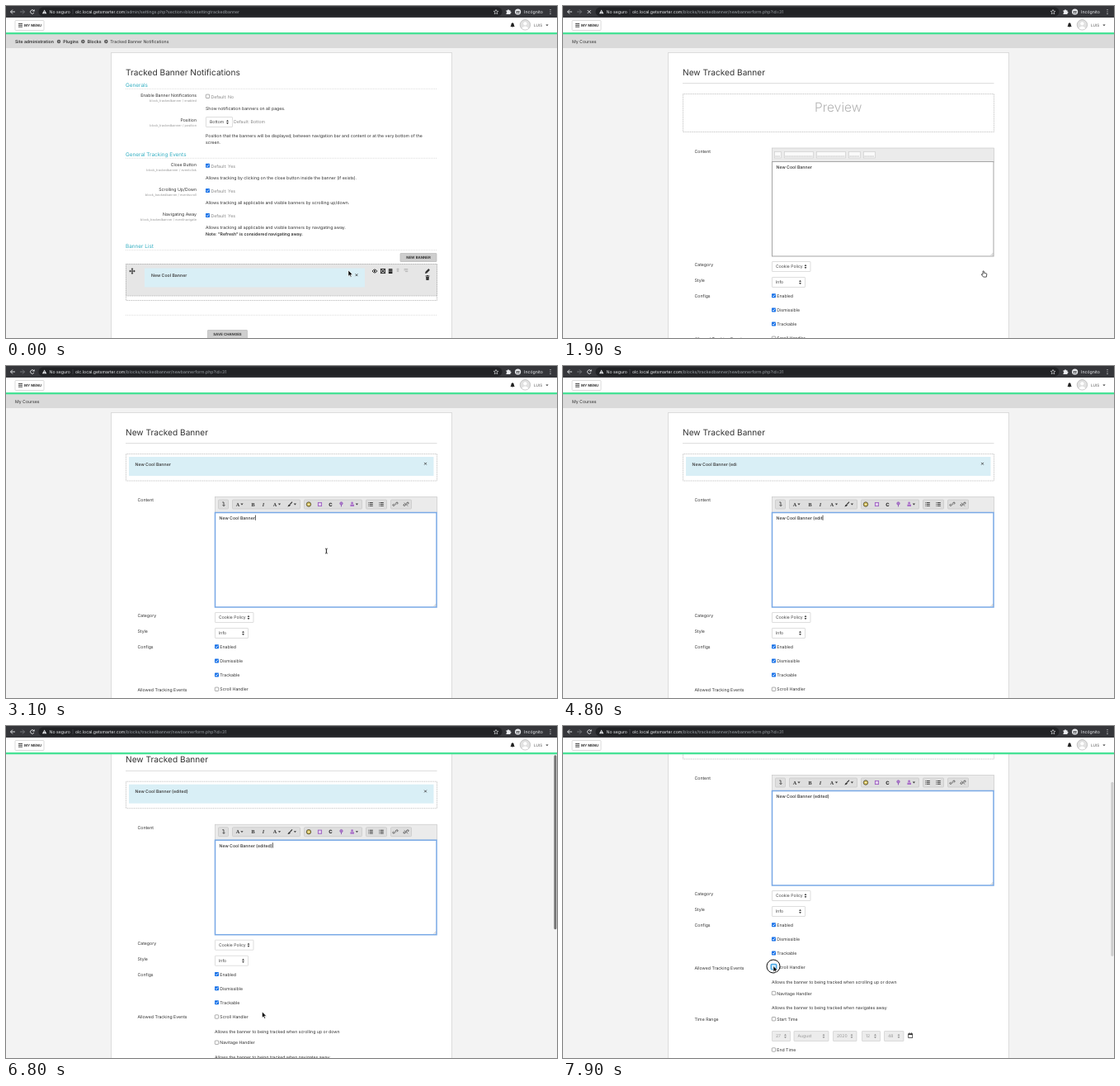
Recreate the animation shown at these times as an HTML page. Size 668 by 402 pixels, loop 8000 ms.

```html
<!DOCTYPE html>
<html lang="en">
<head>
<meta charset="utf-8">
<title>Tracked banner settings</title>
<style>
  html, body { margin: 0; width: 100%; height: 100%; overflow: hidden; background: #f3f3f3; }
  svg { display: block; width: 668px; height: 402px; }
  text { font: 5.2px Inter, "Open Sans", sans-serif; text-rendering: geometricPrecision; white-space: pre; }
</style>
</head>
<body>
<svg id="stage" viewBox="0 0 668 402"></svg>
<script>
const LOOP = 8000;
const BASE_TEXT = 'New Cool Banner', ADDED_TEXT = ' (edited)';
const HOST = 'olc.local.getsmarter.com';
const OLD_PATH = '/admin/settings.php?section=blocksettingtrackedbanner';
const NEW_PATH = '/blocks/trackedbanner/newbannerform.php?id=31';
const INK = '#333', TEAL = '#35afc2', INFO = '#d9eff6', BLUE = '#1a73e8';

// Markup helpers
const text = (x, y, s, { size = 5.2, weight = 400, fill = INK, anchor = 'start', id = '', extra = '' } = {}) =>
  `<text id="${id}" x="${x}" y="${y}" fill="${fill}" text-anchor="${anchor}"
    style="font-size:${size}px;font-weight:${weight};${extra}">${s}</text>`;
const rect = (x, y, w, h, fill, stroke = 'none', extra = '') =>
  `<rect x="${x}" y="${y}" width="${w}" height="${h}" fill="${fill}" stroke="${stroke}" ${extra}/>`;
const path = (d, stroke = INK, width = 1, fill = 'none', extra = '') =>
  `<path d="${d}" fill="${fill}" stroke="${stroke}" stroke-width="${width}" ${extra}/>`;
const shape = (d, fill = INK) => path(d, 'none', 0, fill);
const circle = (x, y, r, fill, stroke = 'none', width = 1) =>
  `<circle cx="${x}" cy="${y}" r="${r}" fill="${fill}" stroke="${stroke}" stroke-width="${width}"/>`;
const group = (id, ...parts) => `<g id="${id}">${parts.join('')}</g>`;
const rule = (y, dash = '1 1') => path(`M145 ${y}H522.5`, '#c4c4c4', .6, 'none', `stroke-dasharray="${dash}"`);
const downCaret = (x, y) => shape(`M${x - 1.6} ${y - .8}h3.2l-1.6 1.8z`);
const cross = (x, y, r, color, width) =>
  path(`M${x - r} ${y - r}l${2 * r} ${2 * r}m0 ${-2 * r}l${-2 * r} ${2 * r}`, color, width);

const checkbox = (x, y, on) => on
  ? rect(x, y - 2.5, 5, 5, BLUE, 'none', 'rx=".7"') + path(`M${x + 1} ${y}l1.1 1.2 2-2.5`, '#fff', .8)
  : rect(x + .3, y - 2.2, 4.4, 4.4, '#fff', '#767676', 'stroke-width=".6" rx=".7"');

const select = (x, y, w, label, disabled) => {
  const color = disabled ? '#999' : '#444', ax = x + w - 6.5;
  return rect(x + .5, y + .5, w - 1, 12, disabled ? '#ececec' : '#fff', '#d0d0d0', 'stroke-width=".7" rx=".5"') +
    text(x + 5, y + 8.4, label, { fill: color, size: 5.1 }) +
    shape(`M${ax - 1.4} ${y + 6}h2.8l-1.4-2.2zM${ax - 1.4} ${y + 7}h2.8l-1.4 2.2z`, color);
};

const button = (x, y, w, h, label) =>
  rect(x + .5, y + .5, w - 1, h - 1, '#cecece', '#b9b9b9', 'stroke-width=".7" rx=".5"') +
  text(x + w / 2, y + 7.3, label, { size: 4.35, weight: 700, anchor: 'middle' });

const setting = (y, label, key, on, note) =>
  text(231, y, label, { anchor: 'end' }) +
  text(231, y + 6.2, `block_trackedbanner / ${key}`, { size: 3.9, fill: '#999', anchor: 'end' }) +
  (on === null ? '' : checkbox(242, y - .5 + (on ? 0 : .2), on) + text(248.5, y + 2.1, `Default: ${on ? 'Yes' : 'No'}`, { fill: '#888' })) +
  text(242, y + (on === null ? 18.7 : 16.3), note);

const heading = (y, label) => text(145, y, label, { size: 6.4, fill: TEAL }) + rule(y + 2.3);
const option = (y, label, on) => checkbox(253, y, on) + text(259.3, y + 2, label);
const formLabel = (y, label) => text(159.5, y, label);

const backdrop = rect(0, 34, 668, 17, '#dadada') + rect(127.5, 56.5, 413, 700, '#fff', '#dcdcdc');

const crumb = (x, label) => text(x, 45, label, { weight: 600 });
const crumbDot = x => circle(x, 43, 2.2, '#555') + path(`M${x - .5} 41.8l1.1 1.2-1.1 1.2`, '#fff', .6);

const rowIcons =
  path('M153 318v6M150 321h6', INK, 1.1) + shape('M153 317l1.4 1.7h-2.8zM153 325l1.4-1.7h-2.8zM149.2 321l1.7-1.4v2.8zM156.8 321l-1.7-1.4v2.8z') +
  path('M444 321q3-4 6 0q-3 4-6 0z', '#222', .9) + circle(447, 321, 1.1, '#222') +
  rect(454.4, 318.4, 5.2, 5.2, '#fff', '#222', 'stroke-width=".9"') + cross(457, 321, 1.7, '#222', 1.2) +
  rect(463.8, 318.2, 4.6, 5.8, '#222') + path('M463.8 319.8h4.6M463.8 321.6h4.6', '#e6e6e6', .4) +
  path('M475 317.5v4.5M473.3 318.8h3.4M473.6 321h2.8', '#aaa', .7) +
  path('M482.5 318.5h4.8M482.5 320h4.8M484 321.6h3.3', '#aaa', .7) +
  shape('M508 324l.6-2.2 3.7-3.7 1.6 1.6-3.7 3.7z') +
  shape('M508.6 326.6h4.8v.9h-4.8zM509.1 328h3.8l-.3 4h-3.2zM510 326h2v.6h-2z');

const settingsPage = group('settingsPage',
  crumb(11, 'Site administration'), crumbDot(64), crumb(69.3, 'Plugins'), crumbDot(93.3),
  crumb(98.8, 'Blocks'), crumbDot(121.3), text(126.3, 45, 'Tracked Banner Notifications'),
  text(145, 83.6, 'Tracked Banner Notifications', { size: 10.15 }),
  heading(98, 'Generals'),
  setting(109.6, 'Enable Banner Notifications', 'enabled', false, 'Show notification banners on all pages.'),
  setting(140, 'Position', 'position', null,
    'Position that the banners will be displayed; between navigation bar and content or at the very bottom of the'),
  text(242, 167, 'screen.'),
  select(242, 134, 33, 'Bottom'), text(276, 142, 'Default: Bottom', { fill: '#888' }),
  heading(182, 'General Tracking Events'),
  setting(193.8, 'Close Button', 'eventclick', true, 'Allows tracking by clicking on the close button inside the banner (if exists).'),
  setting(224, 'Scrolling Up/Down', 'eventscroll', true, 'Allows tracking all applicable and visible banners by scrolling up/down.'),
  setting(254, 'Navigating Away', 'eventnavigate', true, 'Allows tracking all applicable and visible banners by navigating away.'),
  text(242, 278.3, 'Note: "Refresh" is considered navigating away.', { weight: 600 }),
  heading(293.3, 'Banner List'),
  button(477.5, 299, 45, 11, 'NEW BANNER'),
  rect(145.5, 312.5, 377, 44, '#fff', '#aaa', 'stroke-width=".7" stroke-dasharray="1 .6"'),
  rect(145.5, 312.5, 377, 38.5, '#e6e6e6', '#aaa', 'stroke-width=".7" stroke-dasharray="1 .6"'),
  rect(168, 317.5, 267, 23, INFO),
  text(176, 328, BASE_TEXT, { weight: 600, fill: '#444' }),
  cross(425, 325.7, 1.4, '#333', .8),
  rowIcons,
  group('focusRings',
    rect(506.5, 316.5, 9, 8.5, 'none', '#2d9fd0', 'stroke-width="1.2"'),
    rect(491, 317, 3, 9, 'none', '#2d9fd0', 'stroke-width="1.2"')),
  rule(374.3),
  button(244, 392, 49, 14, 'SAVE CHANGES'));

// Editor toolbar once loaded
const toolGroup = (x1, x2) => rect(x1 + .5, 162, x2 - x1 - 1, 11, '#dedede', '#c6c6c6', 'stroke-width=".7" rx="1"');
const letter = (x, s, extra = '') =>
  text(x, 169.5, s, { size: 6.2, weight: 700, anchor: 'middle', extra: `font-family:'Liberation Serif',serif;${extra}` });
const listIcon = x => [165.5, 167.4, 169.3].map(y => path(`M${x - 2.6} ${y}h1M${x - 1} ${y}h3.8`, INK, .9)).join('');
const chain = x => path(`M${x - .4} 168.2l-1 1a1 1 0 0 1-1.4-1.4l1-1M${x + .4} 166.2l1-1a1 1 0 0 1 1.4 1.4l-1 1M${x - .8} 168l1.6-1.6`, INK, .8);
const toolbar =
  toolGroup(257, 270) + toolGroup(274, 357) + toolGroup(361, 432) + toolGroup(436, 462) + toolGroup(466, 492) +
  path('M262.3 165h1.7v4.5M262.6 168.2l1.4 1.5 1.4-1.5', INK, .8) +
  letter(281, 'A') + downCaret(286, 167.4) + letter(299.5, 'B') + letter(312, 'I', 'font-style:italic') +
  letter(326, 'A') + downCaret(331.5, 167.4) +
  path('M347 164.6l-2.6 2.8', INK, 1.2) + shape('M341.2 170.2q1-.4 1.2-2l1.6-.9 1 1q-.8 2.2-3.8 1.9z') + downCaret(350.4, 167.4) +
  circle(367, 167.5, 2.7, '#d7c35a', '#55503a', .9) + circle(367, 167.5, .8, '#fff') +
  rect(378.4, 165.4, 4.2, 4.2, '#e5d2ef', '#9a5cc0', 'stroke-width=".9"') +
  text(393.5, 169.6, 'C', { size: 6, weight: 800, anchor: 'middle' }) +
  circle(406.5, 166.4, 1.7, '#b07fce', '#8b4fb3', .7) + path('M406.5 168v2.4', '#8b4fb3', .9) +
  circle(419.6, 166, 1.4, '#a96fc9') + rect(417.4, 167.6, 4.6, 2.4, '#a96fc9') + downCaret(425.4, 167.4) +
  listIcon(442) + listIcon(455) + chain(472) + chain(485) + path('M482.6 165.6l4.8 4', INK, .5);

const placeholders = [[256, 265], [268, 304], [307, 343], [346, 361], [364, 379]].map(([a, b]) =>
  rect(a + .5, 176.5, b - a - 1, 7.5, '#fafafa', '#cfcfcf', 'stroke-width=".7"') +
  path(`M${a + 1.5} 182H${b - 1.5}`, '#aaa', .8, 'none', 'stroke-dasharray="1.4 .6"')).join('');

const box = (y, h) => rect(145.5, y + .5, 377, h - 1, '#fff', '#b5b5b5', 'stroke-width=".7" stroke-dasharray="1 .6"');

const formPage = group('formPage',
  text(11, 45, 'My Courses'),
  text(145, 83.6, 'New Tracked Banner', { size: 10.15 }), rule(93.6, 'none'),
  group('loading',
    box(106, 47),
    text(333.7, 127.7, 'Preview', { size: 15.5, weight: 300, fill: '#b3b3b3', anchor: 'middle' }),
    formLabel(178, 'Content'),
    rect(253.5, 172, 269, 17, '#ebebeb', '#c9c9c9', 'stroke-width=".7"'), placeholders),
  group('ready',
    box(106, 33.5),
    rect(149, 110, 369.5, 23, INFO),
    text(156.5, 120.5, '', { id: 'previewText', weight: 600, fill: '#444' }),
    cross(508.5, 118.3, 1.4, '#333', .8),
    formLabel(164, 'Content'),
    rect(253.5, 158.5, 269, 19, '#ebebeb', '#c9c9c9', 'stroke-width=".7"'), toolbar),
  group('form',
    rect(253.5, 177.5, 268.5, 114.5, '#fff', '#a5a5a5', 'id="area"'),
    path('M518.5 291l3-3M520.2 291l1.3-1.3', '#999', .5),
    text(258.5, 185.8, '', { id: 'editorText', weight: 600, fill: '#444' }),
    rect(0, 180.6, .7, 6.2, '#111', 'none', 'id="caret"'),
    formLabel(304.2, 'Category'), select(253, 298, 47.5, 'Cookie Policy'),
    formLabel(323.2, 'Style'), select(253, 317, 41, 'Info'),
    formLabel(342, 'Configs'), option(339.8, 'Enabled', true), option(357, 'Dismissible', true), option(374, 'Trackable', true),
    formLabel(393.6, 'Allowed Tracking Events'), option(391.3, 'Scroll Handler', false),
    text(253, 410.8, 'Allows the banner to being tracked when scrolling up or down'),
    option(422.5, 'Navitage Handler', false),
    text(253, 442, 'Allows the banner to being tracked when navigates away'),
    formLabel(456, 'Time Range'), option(453.7, 'Start Time', false),
    select(253, 468, 23, '27', true), select(279.5, 468, 43, 'August', true), select(327, 468, 29.5, '2020', true),
    select(362, 468, 23, '12', true), select(389, 468, 24.5, '48', true),
    rect(418.7, 471.7, 5, 4.8, '#fff', '#333', 'stroke-width=".8"'), path('M418.5 472.5h5.4M420 470.4v1.4M422.4 470.4v1.4', INK, 1),
    option(491, 'End Time', false)));

const light = '#e8eaed';
const browserBar =
  rect(0, 0, 668, 14, '#35363a') + rect(39.5, 1.6, 562, 10.8, '#202124', 'none', 'rx="5.4"') +
  path('M11 7H5.6M8 4.5L5.5 7 8 9.5', light, .9) + path('M17 7h5.4M20 4.5L22.5 7 20 9.5', '#77797d', .9) +
  group('reload', path('M33.7 5.6A2.3 2.3 0 1 0 34 8', light, .9), shape('M34.6 4v2.6H32z', light)) +
  group('stop', cross(31.7, 7, 2, light, .9)) +
  shape('M46.6 4.4l2.7 4.9h-5.4z', light) + path('M46.6 6.2v1.4M46.6 8.1v.6', '#202124', .6) +
  text(52.5, 8.9, 'No seguro', { fill: light }) + path('M81 4v6', '#5f6368', .5) +
  `<text x="84" y="8.9" fill="${light}">${HOST}<tspan id="urlPath" fill="#9aa0a6"></tspan></text>` +
  path('M594 4.4l.8 1.8 2 .2-1.5 1.3.5 2-1.8-1-1.8 1 .5-2-1.5-1.3 2-.2z', light, .6) +
  shape('M606.5 5.3h1.5a1 1 0 0 1 2 0h1.5v1.5a1 1 0 0 1 0 2v1.3h-5v-1.4a1 1 0 0 0 0-1.9z', light) +
  circle(620.6, 7, 3.6, light) + path('M618.4 6.6h4.4', '#202124', .8) + circle(619.5, 8.2, .8, '#202124') + circle(621.7, 8.2, .8, '#202124') +
  text(628, 8.9, 'Incógnito', { fill: light }) +
  [4.6, 7, 9.4].map(y => circle(660, y, .6, light)).join('');

const siteBar =
  rect(0, 14, 668, 18, '#fff') + rect(0, 32, 668, 2.3, '#45e295') +
  rect(11, 17.5, 35, 12, '#fff', '#d3d3d3', 'stroke-width=".8" rx="1"') +
  path('M15 21.4h5M15 23.3h5M15 25.2h5', INK, .9) +
  text(22, 24.9, 'MY MENU', { size: 4.3, weight: 700 }) +
  shape('M611.4 25q1-.8 1-2.4 0-2.2 1.7-2.4 1.7.2 1.7 2.4 0 1.6 1 2.4zM613.3 25.4h1.6q-.8 1.2-1.6 0z', '#222') +
  circle(629.4, 22.8, 6.2, '#e2e2e2', '#a8a8a8', .6) + circle(629.4, 21.3, 2.1, '#fff') + shape('M625.2 27q4.2-5 8.4 0-4.2 3.2-8.4 0z', '#fff') +
  text(640, 24.8, 'LUIS', { size: 4.6, fill: '#555' }) + downCaret(656, 23.2);

const status = group('status',
  rect(0, 393.5, 161.5, 9, '#3a3b3f', '#55565a', 'id="statusBox" stroke-width=".6"'),
  text(1.5, 399.7, '', { id: 'statusText', size: 4.45, fill: light }));

const pointer = group('pointer',
  group('arrow', path('M0 0V7.2L1.7 5.7 2.8 8.2 4 7.7 2.9 5.2H5.2Z', '#fff', .6, '#000')),
  group('hand', path('M-1 1.6V-2a.7.7 0 0 1 1.4 0V-.3L3 .2q.9.2.8 1.2L3.3 4.6H-.4L-2.8 1.6q.4-1 1.8 0z', '#111', .7, '#fff')),
  group('ibeam', path('M-1.4-3Q0-3 0-2V2Q0 3-1.4 3M1.4-3Q0-3 0-2V2Q0 3 1.4 3', '#222', .8)));

document.getElementById('stage').innerHTML =
  rect(0, 0, 668, 402, '#f3f3f3') +
  group('page', backdrop, settingsPage, formPage) + siteBar + browserBar +
  rect(664.4, 0, 3, 211, '#5c5c5c', 'none', 'id="thumb" rx="1.5"') + status +
  group('clickRing', circle(255, 291, 8, '#fff', '#111', 1),
    rect(252.3, 288.5, 6.4, 6.2, '#d8efff', '#49a9e6', 'stroke-width="1.6" rx="1"')) + pointer;

// Motion
const $ = id => document.getElementById(id);
const show = (id, on) => $(id).setAttribute('display', on ? 'inline' : 'none');
const set = (id, name, value) => $(id).setAttribute(name, value);
const move = (id, x, y) => set(id, 'transform', `translate(${x} ${y})`);
const between = (t, a, b) => t >= a && t < b;
const progress = (t, a, b) => Math.min(1, Math.max(0, (t - a) / (b - a)));
const smooth = p => p * p * (3 - 2 * p);

// time, x, y
const pointerPath = [[0, 415, 320], [900, 510, 320], [1000, 510, 323.5], [2250, 510, 323.5], [2950, 388.5, 224],
  [6100, 376, 226], [6500, 310.5, 346], [7050, 310.5, 346], [7500, 255, 290.5], [LOOP, 255, 290.5]];
// time, number of added characters
const editorKeys = [[4000, 2], [4300, 3], [4600, 5], [4800, 6], [5000, 7], [5200, 8], [5500, 9]];
const previewKeys = [[4100, 2], [4400, 3], [4600, 5], [5000, 7], [5200, 8], [5600, 9]];

const typed = (keys, t) => BASE_TEXT + ADDED_TEXT.slice(0, keys.reduce((n, [at, count]) => t >= at ? count : n, 0));

function pointerAt(t) {
  const i = pointerPath.findIndex(([at]) => t < at);
  const [t0, x0, y0] = pointerPath[i - 1], [t1, x1, y1] = pointerPath[i];
  const p = smooth(progress(t, t0, t1));
  return [x0 + (x1 - x0) * p, y0 + (y1 - y0) * p];
}

function draw(t) {
  const onForm = t >= 1700, ready = t >= 2400, focused = t >= 3000;
  const scroll = 99 * (1 - (1 - progress(t, 6600, 7500)) ** 2);

  show('settingsPage', !onForm);
  show('formPage', onForm);
  show('focusRings', t >= 1200);
  show('loading', !ready);
  show('ready', ready);
  move('form', 0, ready ? 0 : 11);
  move('page', 0, -scroll);
  set('area', 'stroke', focused ? '#78a9e6' : '#a5a5a5');
  set('area', 'stroke-width', focused ? 1.5 : 1);

  $('editorText').textContent = typed(editorKeys, t);
  $('previewText').textContent = typed(previewKeys, t);
  show('caret', between(t, 3000, 3500) || between(t, 4000, 6000) || between(t, 6500, 7000));
  if (onForm) set('caret', 'x', 258.7 + $('editorText').getComputedTextLength());

  const stopping = between(t, 1200, 2400);
  show('stop', stopping);
  show('reload', !stopping);
  $('urlPath').textContent = t < 1500 ? OLD_PATH : NEW_PATH;

  const waiting = between(t, 2100, 2400);
  show('status', waiting || between(t, 1000, 1700));
  set('statusBox', 'width', waiting ? 223.5 : 161.5);
  $('statusText').textContent = waiting ? `Esperando a ${HOST}...` : HOST + NEW_PATH;

  set('thumb', 'y', 14 + scroll * .544);
  set('thumb', 'opacity', t < 6650 ? 0 : .85 - .6 * progress(t, 7500, 7900));

  const [x, y] = pointerAt(t);
  const hand = between(t, 1000, 2400), ibeam = !hand && between(t, 2400, 6300) && y < 292;
  show('pointer', !between(t, 3500, 6200));
  move('pointer', x, y);
  show('hand', hand);
  show('ibeam', ibeam);
  show('arrow', !hand && !ibeam);
  show('clickRing', t >= 7800);
}

function frame() {
  draw(performance.now() % LOOP);
  requestAnimationFrame(frame);
}
frame();
</script>
</body>
</html>
```
